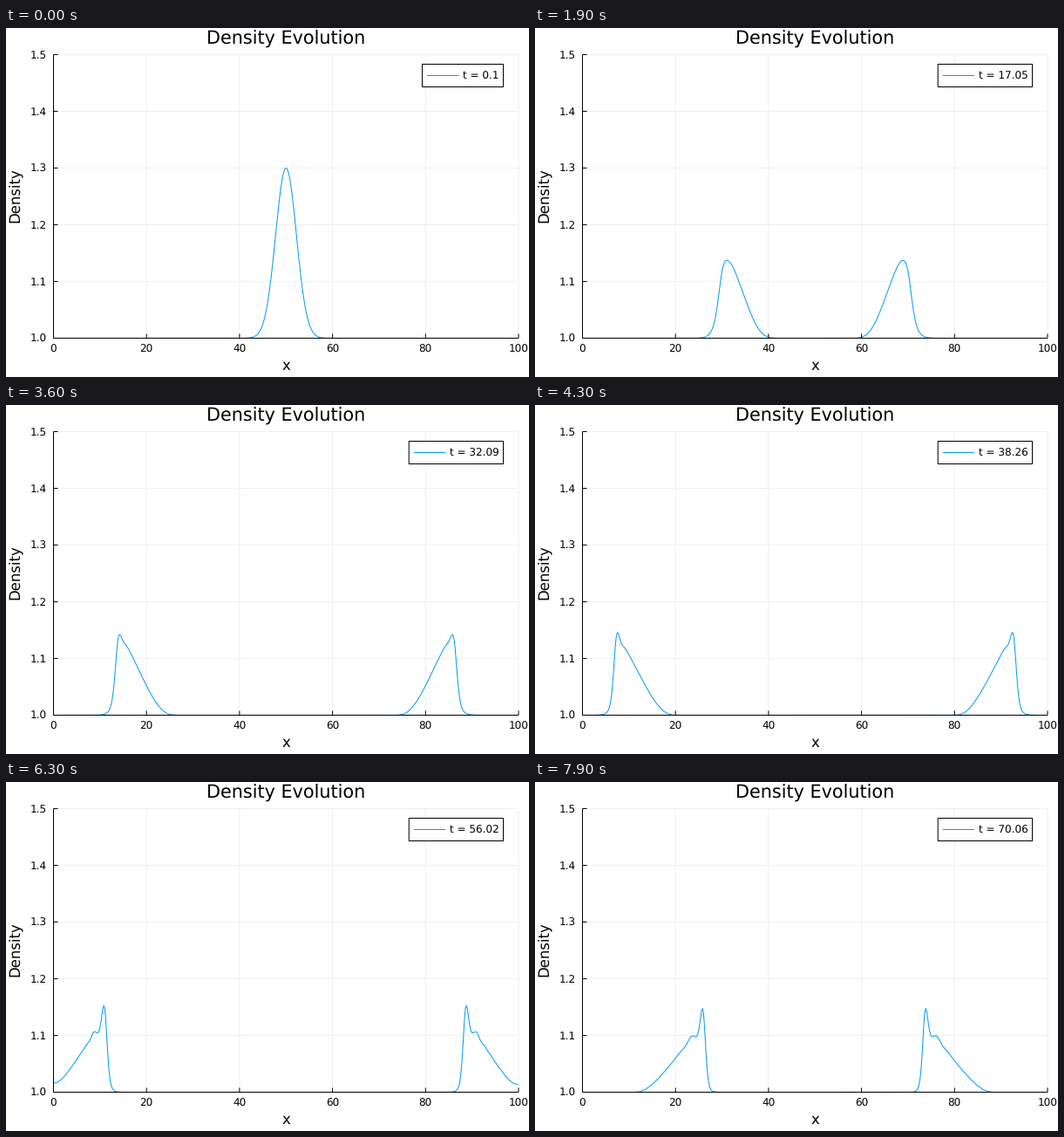
A matplotlib script for the animation above (8000 ms loop, 600 px wide and 400 px high).

```python
import numpy as np
import matplotlib.pyplot as plt
from matplotlib.animation import FuncAnimation
from matplotlib.patches import Rectangle

W, H, DPI = 600, 400, 100
PX = 72 / DPI                      # one pixel in points
FRAMES, INTERVAL = 80, 100
BLUE, GRID = "#009afa", "#f0f0f0"
LEFT, RIGHT, TOP, BOTTOM = 54.5, 588, 30.5, 355.5

# Isothermal gas (sound speed 1) between two closed walls
CELLS, DX, CFL, SUBSTEPS = 500, 0.2, 0.5, 10
x = np.arange(CELLS) * DX


def advect(q, face_flux, dt):
    return q - dt / DX * np.diff(np.r_[0, face_flux, 0])


def step(n, m, dt):
    """Donor-cell advection, then a centred pressure push."""
    u = m / n
    face = (u[1:] + u[:-1]) / 2
    n = advect(n, face * np.where(face > 0, n[:-1], n[1:]), dt)
    q = m * m / n
    m = advect(m, np.where(face > 0, q[:-1], q[1:]), dt)
    p = np.r_[n[0], n, n[-1]]
    return n, m - dt * (p[2:] - p[:-2]) / (2 * DX)


def evolve():
    n = 1 + 0.3 * np.exp(-(x - 50) ** 2 / 10)
    m = np.zeros(CELLS)
    t, times, states = 0.0, [], []
    for i in range((FRAMES - 1) * SUBSTEPS + 1):
        dt = CFL * DX / (1 + np.abs(m / n).max())
        n, m = step(n, m, dt)
        t += dt
        if i % SUBSTEPS == 0:
            times.append(t)
            states.append(n)
    return times, states


times, states = evolve()


def to_x(v):
    return LEFT + (RIGHT - LEFT) * v / 100


def to_y(v):
    return BOTTOM - (BOTTOM - TOP) * (v - 1) / 0.5


plt.rcParams["font.family"] = "DejaVu Sans"
plt.rcParams["text.hinting"] = "none"
fig = plt.figure(figsize=(W / DPI, H / DPI), dpi=DPI, facecolor="white")
ax = fig.add_axes([0, 0, 1, 1])
ax.set_xlim(0, W)
ax.set_ylim(H, 0)
ax.axis("off")


def rule(x0, y0, x1, y1, color="black", z=4):
    return ax.plot([x0, x1], [y0, y1], color=color, lw=PX, zorder=z,
                   solid_capstyle="butt", snap=False)[0]


def label(px, py, text, size, ha="center", va="baseline", **kw):
    return ax.text(px, py, text, fontsize=size * PX, ha=ha, va=va,
                   zorder=7, **kw)


for v in range(0, 101, 20):
    px = to_x(v)
    if v:
        rule(px, TOP, px, BOTTOM, GRID, 1)
    rule(px, BOTTOM, px, BOTTOM - 5)
    label(px - 0.3, 371.5, str(v), 12)
for k in range(6):
    v = 1 + k / 10
    py = to_y(v)
    if k:
        rule(LEFT, py, RIGHT, py, GRID, 1)
    rule(LEFT, py, LEFT + 5, py)
    label(47, py + 4.5, f"{v:.1f}", 12, "right")
rule(LEFT, BOTTOM, RIGHT, BOTTOM)
rule(LEFT, TOP, LEFT, BOTTOM)

label(321.25, 18.3, "Density Evolution", 20.8)
label(321.25, 391.8, "x", 16.5)
label(19, 192, "Density", 16.5, "right", "center", rotation=90)

curve, = ax.plot([], [], color=BLUE, lw=PX, zorder=3)
curve.set_clip_path(Rectangle((LEFT, TOP), RIGHT - LEFT, BOTTOM - TOP,
                              transform=ax.transData))

box = ax.add_patch(Rectangle((477.5, 41.5), 93, 26, fc="white", ec="black",
                             lw=PX, zorder=5, snap=False))
key = rule(0, 54.5, 0, 54.5, BLUE, 6)
stamp = label(0, 59.2, "", 12, "left")


def draw(i):
    curve.set_data(to_x(x), to_y(states[i]))
    value = str(round(float(times[i]), 2))
    width = 93 + 7.63 * (len(value) - 3)
    left = 570.5 - width
    box.set_x(left)
    box.set_width(width)
    key.set_xdata([left + 5.5, left + 42])
    stamp.set_x(left + 47)
    stamp.set_text("t = " + value)
    return curve, box, key, stamp


anim = FuncAnimation(fig, draw, frames=FRAMES, interval=INTERVAL,
                     init_func=lambda: draw(0), repeat=True, repeat_delay=0)
plt.show()
```
